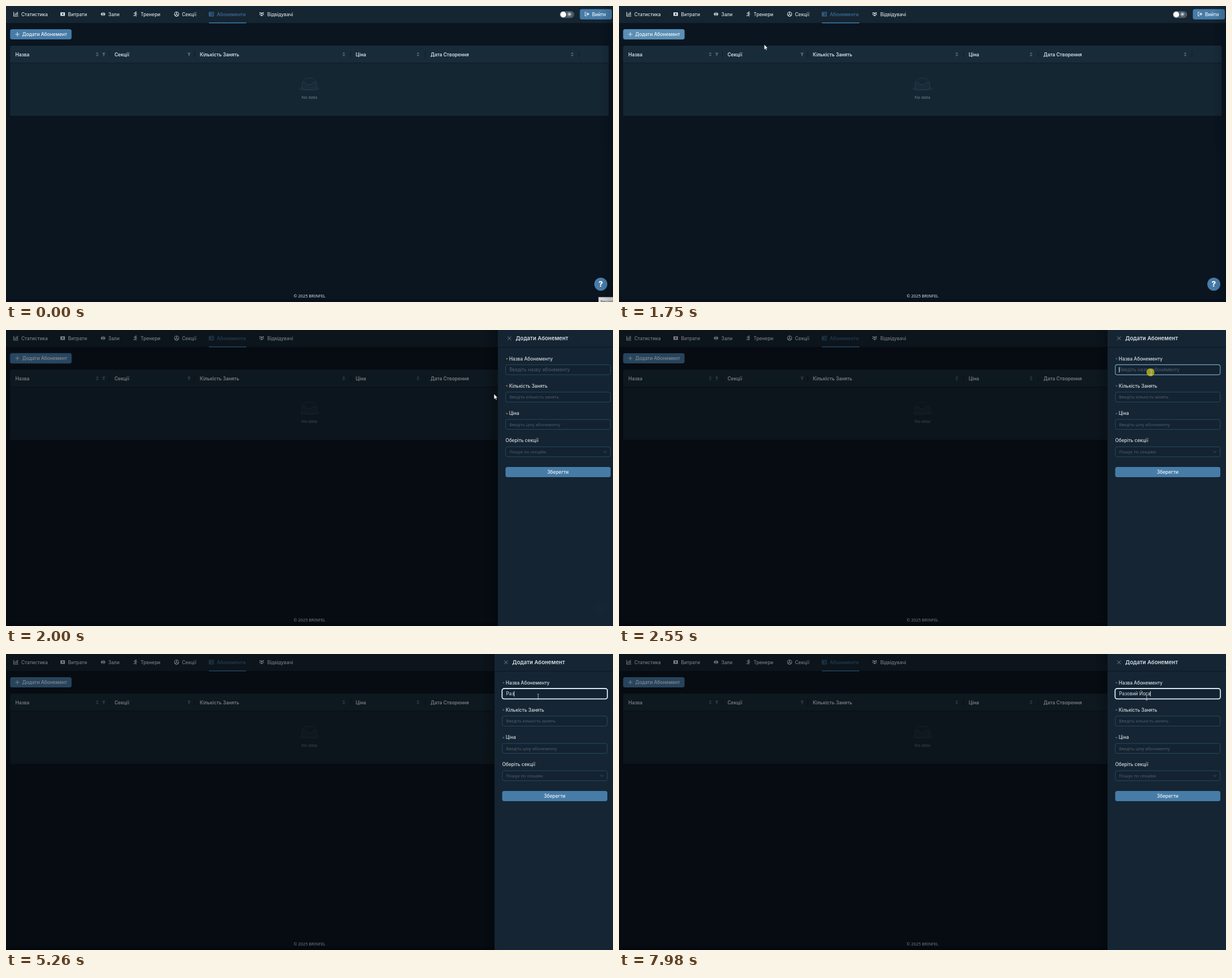
Recreate the animation shown at these times as an HTML page. Size 1071x523 px, loop 8000 ms.

```html
<!DOCTYPE html>
<html lang="uk">
<head>
<meta charset="utf-8">
<title>Абонементи</title>
<style>
html, body { margin: 0; width: 100%; height: 100%; overflow: hidden; background: #0a1520; }
svg { display: block; width: 100vw; height: 100vh; }
text { font: 500 8.25px Inter, "Noto Sans", sans-serif; fill: #d9e0e6; white-space: pre; }
.head { font-weight: 600; font-size: 8.3px; }
.title { font-weight: 600; font-size: 9.6px; }
.btn { font-size: 8.3px; fill: #f2f6fa; }
.active { fill: #3e7099; }
.small { font: 400 7.4px "Noto Sans", sans-serif; }
.hint { fill: #4e5f6e; }
.big { font-size: 8.25px; font-weight: 400; }
.mid { text-anchor: middle; }
.ico { fill: none; stroke: #d9e0e6; stroke-width: 1.1; }
.solid { fill: #d9e0e6; stroke: none; }
.blue { stroke: #3e7099; }
.dim { fill: #536574; }
</style>
</head>
<body>
<svg id="stage" viewBox="0 0 1071 523" preserveAspectRatio="none">
  <defs>
    <linearGradient id="shade">
      <stop offset="0" stop-color="#000" stop-opacity="0"/>
      <stop offset="1" stop-color="#000" stop-opacity=".22"/>
    </linearGradient>
  </defs>
  <g id="page">
    <rect width="1071" height="523" fill="#0a1520"/>
    <rect y="518" width="1071" height="5" fill="#07101b"/>
    <rect width="1071" height="30" fill="#152532"/>
    <rect x="358" y="29" width="66" height="1.5" fill="#3f7dac"/>
    <g id="icons">
      <path class="ico" d="M13.6 10.5v7.5h8M16 16.5v-3M18.2 16.5v-5M20.4 16.5v-6"/>
      <path class="ico solid" d="M96 11.2h8v6.2h-8zM98.7 14.3a1.4 1.4 0 0 0 2.8 0 1.4 1.4 0 0 0-2.8 0z" fill-rule="evenodd"/>
      <path class="ico" d="M167 14.3h8.4M168.5 12.4v4M170 11v6.6M172.6 11v6.6M174.1 12.4v4"/>
      <circle class="ico solid" cx="229.3" cy="10.9" r="1.1"/>
      <path class="ico" d="M225.3 13.4l1.8-1.2 2 .8-1.2 2.5 1.8 1.2-.5 2M227.6 15.5l-1 1.8h-2M229 13l1 1.2h1.6"/>
      <circle class="ico" cx="301" cy="14.3" r="3.8" stroke-width=".8"/>
      <path class="ico" stroke-width=".8" d="M301 10.5v3.4l-2.6 3M301 13.9l2.6 3"/>
      <path class="ico blue" stroke-width=".9" d="M358.5 11h7.6v6.6h-7.6zM360 13h2v1.6h-2zM363.3 13h1.6M363.3 15h1.6M360 16h2"/>
      <path class="ico solid" d="M449 17.6c0-3.3 4.2-3.3 4.2 0zM447 15.8c0-2 1.8-2.3 2.3-1.3l-.8 1.3zM455.2 15.8c0-2-1.8-2.3-2.3-1.3l.8 1.3z"/>
      <circle class="ico solid" cx="451.1" cy="13" r="1.5"/>
      <circle class="ico solid" cx="448.4" cy="12.2" r="1.1"/>
      <circle class="ico solid" cx="453.8" cy="12.2" r="1.1"/>
    </g>
    <rect x="977" y="9" width="25.5" height="12.2" rx="6.1" fill="#4b5a67"/>
    <circle cx="983.2" cy="15.1" r="5.1" fill="#fff"/>
    <circle cx="994" cy="14.6" r="1.5" fill="#f2f6fa"/>
    <circle cx="994" cy="14.6" r="2.8" fill="none" stroke="#f2f6fa" stroke-width="1.1" stroke-dasharray="1.2 1"/>
    <rect x="1012.5" y="5.5" width="56.5" height="18.2" rx="3.5" fill="#477ca8"/>
    <path class="ico" d="M1024.6 11h-2.8v6.4h2.8"/>
    <path class="ico solid" d="M1024 13.2h2v-2l3.3 3-3.3 3v-2h-2z"/>
    <rect id="wave" x="6.5" y="40.5" width="109.5" height="19" rx="4" fill="none" stroke="#477ca8"/>
    <rect id="add" x="7.3" y="41" width="108.4" height="18" rx="3.5" fill="#477ca8"/>
    <path class="ico" stroke-width=".9" d="M16.3 50h7.4M20 46.3v7.4"/>
    <path d="M7.3 194V74a4 4 0 0 1 4-4h1048a4 4 0 0 1 4 4v120z" fill="#152633"/>
    <path d="M7.3 100.5V74a4 4 0 0 1 4-4h1048a4 4 0 0 1 4 4v26.5z" fill="#182b39"/>
    <path d="M7.3 100.8h1056" stroke="#0d1924"/>
    <g id="marks"></g>
    <g transform="translate(517.3 127.8) scale(.56)" fill="none" stroke="#2c3e4c" stroke-width="1.4">
      <ellipse cx="32" cy="33" rx="32" ry="7" fill="#1c2e3b" stroke="none"/>
      <path fill="#152633" d="M9 13L19.5 1.2Q20.5 0 21.5 0h21q1 0 2 1.2L55 13v19q0 3-3 3H12q-3 0-3-3z"/>
      <path fill="#192b38" d="M9 13h11q2.4 0 2.4 3t2.4 3h14.4q2.4 0 2.4-3t2.4-3h11v19q0 3-3 3H12q-3 0-3-3z"/>
    </g>
    <circle cx="1049.5" cy="491.5" r="11.5" fill="#477ca8"/>
    <text class="mid" x="1049.5" y="496.2" style="font-size:13.5px;font-weight:800;fill:#fff">?</text>
    <g id="tip">
      <rect x="1045.5" y="514.5" width="30" height="12" fill="#d9d9d9" stroke="#8b8f94"/>
      <text class="small" x="1049" y="525" style="fill:#444;font-size:7px">Record</text>
    </g>
  </g>
  <rect id="mask" width="1071" height="523"/>
  <g id="drawer">
    <rect x="840" width="22" height="523" fill="url(#shade)"/>
    <rect x="862" width="215" height="523" fill="#152533"/>
    <path d="M862 30.3h215" stroke="#0c1823"/>
    <path d="M879 11.5l6.4 6.4M885.4 11.5l-6.4 6.4" stroke="#8794a0" stroke-width=".9"/>
    <g id="form"></g>
    <path d="M1048.4 213.6l2.7 3 2.7-3" fill="none" stroke="#45586a" stroke-width=".9"/>
    <rect x="875.5" y="242" width="185.5" height="18" rx="3.5" fill="#477ca8"/>
    <path id="caret" d="M0 65.5v9.5" stroke="#e6edf3" stroke-width=".9"/>
  </g>
  <circle id="press" r="7" fill="#d2cc16" opacity=".72"/>
  <g id="arrow"><path d="M0 0v9.2l2.1-1.9 1.4 3.1 1.5-.7-1.4-3h2.9z" fill="#fff" stroke="#10151b" stroke-width=".5"/></g>
  <g id="hand"><path d="M-.9.5q0-1 .9-1t.9 1v4l3 .7q1.4.4 1.3 1.8l-.6 4.3h-5.4L-3.7 7.6q-.6-1.3.7-1.4l2.1 1.4z" fill="#fff" stroke="#10151b" stroke-width=".7"/></g>
  <g id="beam"><path d="M-1.6-4.5h1.2l.4.4.4-.4h1.2M0-4.1v8.2M-1.6 4.5h1.2l.4-.4.4.4h1.2" fill="none" stroke="#c9d2da" stroke-width=".8"/></g>
</svg>
<script>
const LOOP = 8000, NS = "http://www.w3.org/2000/svg";
const $ = id => document.getElementById(id);

function add(parent, tag, attrs, text) {
  const el = document.createElementNS(NS, tag);
  set(el, attrs);
  if (text) el.textContent = text;
  return parent.appendChild(el);
}
function set(el, attrs) {
  for (const k in attrs) el.setAttribute(k, attrs[k]);
}
const label = (parent, x, y, text, cls = "") => add(parent, "text", { x, y, class: cls }, text);

const page = $("page"), form = $("form"), marks = $("marks"), drawer = $("drawer");

[["Статистика", 27], ["Витрати", 109.5], ["Зали", 180.5], ["Тренери", 237.5], ["Секції", 310.5],
 ["Абонементи", 372, "active"], ["Відвідувачі", 461]].forEach(([s, x, cls]) => label(page, x, 17.5, s, cls));
label(page, 1034, 17.5, "Вийти", "btn");
label(page, 28.5, 53, "Додати Абонемент", "btn");
[["Назва", 16.5], ["Секції", 191.5], ["Кількість Занять", 342], ["Ціна", 617], ["Дата Створення", 749]]
  .forEach(([s, x]) => label(page, x, 88.5, s, "head"));
label(page, 535.3, 164, "No data", "small mid").style.fill = "#76838e";
label(page, 535.5, 514.5, "© 2025 BRINFEL", "small mid");

for (const x of [182.5, 333, 608, 740, 1011])
  add(marks, "path", { d: `M${x} 79.5v12`, stroke: "#0f1d28" });
for (const x of [161, 596, 727, 999])
  add(marks, "path", { class: "dim", d: `M${x - 2.6} 84.6l2.6-3 2.6 3zM${x - 2.6} 86.2l2.6 3 2.6-3z` });
for (const x of [172.5, 323])
  add(marks, "path", { class: "dim", d: `M${x - 3} 82.5h6l-2 3v3h-2v-3z` });

label(form, 893.3, 17.8, "Додати Абонемент", "title");
const stars = [], boxes = [], hints = [];
[["Назва Абонементу", "Введіть назву абонементу", "big"],
 ["Кількість Занять", "Введіть кількість занять", "small"],
 ["Ціна", "Введіть ціну абонементу", "small"],
 ["Оберіть секції", "Пошук по секціям", "small"]].forEach(([name, hint, cls], i) => {
  const y = 48.3 * i;
  if (i < 3) stars.push(label(form, 875.8, 54 + y, "*", "small"));
  label(form, i < 3 ? 881.8 : 875.5, 53.5 + y, name);
  boxes.push(add(form, "rect", { x: 875.7, y: 61.4 + y, width: 185, height: 17.6, rx: 3.2, fill: "#142331", stroke: "#254a64" }));
  hints.push(label(form, 882.3, 73.1 + y, hint, cls + " hint"));
});
const typed = label(form, 882.3, 73.1, "", "big");
label(drawer, 968, 254, "Зберегти", "btn mid");

const word = "Разовий Йога";
// [time, letters shown]
const typing = [[4580, 1], [5190, 2], [5260, 3], [5380, 4], [5450, 5], [5650, 7], [5790, 8],
  [6520, 9], [6720, 10], [6860, 11], [6920, 12]];
// caret switches on, off, on, off...
const blinks = [2490, 3110, 3640, 4170, 4580, 5120, 5190, 6320, 6520, 7460, 7980];
// [time, x, y]
const route = [[70, 1064, 519], [210, 960, 470], [400, 560, 330], [610, 131, 170], [820, 166, 106],
  [960, 120, 74], [1110, 72, 51], [1180, 70, 49.5], [1710, 70, 49.5], [1870, 796.5, 121.5],
  [2080, 900, 108], [2410, 939, 75.5], [7979, 939, 75.5], [7980, 931, 77]];

const clamp = v => Math.max(0, Math.min(1, v));
const ramp = (t, start, len) => clamp((t - start) / len);
const mix = (a, b, p) => a + (b - a) * p;
const blend = (a, b, p) => `rgb(${a.map((v, i) => Math.round(mix(v, b[i], p)))})`;
const last = (table, t) => table.filter(r => r[0] <= t).pop();
const show = (el, on) => el.setAttribute("visibility", on ? "visible" : "hidden");

// CSS "ease"
function ease(x) {
  let lo = 0, hi = 1, u = x;
  for (let i = 0; i < 20; i++) {
    u = (lo + hi) / 2;
    const bx = .75 * u * (1 - u) + u * u * u;
    if (bx < x) lo = u; else hi = u;
  }
  return .3 * u * (1 - u) * (1 - u) + 3 * u * u * (1 - u) + u * u * u;
}

function pointer(t) {
  const i = route.findIndex(r => r[0] > t);
  if (i < 0) return route[route.length - 1].slice(1);
  if (i === 0) return route[0].slice(1);
  const [t0, x0, y0] = route[i - 1], [t1, x1, y1] = route[i];
  const p = (t - t0) / (t1 - t0);
  return [mix(x0, x1, p), mix(y0, y1, p)];
}

function draw(t) {
  const [x, y] = pointer(t);
  const onButton = t < 1800 && x < 116 && y < 59;
  const onInput = t > 2300;
  show($("arrow"), t >= 70 && !onButton && !onInput);
  show($("hand"), onButton);
  show($("beam"), onInput);
  for (const id of ["arrow", "hand", "beam"]) $(id).setAttribute("transform", `translate(${x} ${y})`);
  show($("tip"), t < 70);

  const hover = ramp(t, 1040, 130) * (1 - ramp(t, 1720, 150));
  $("add").setAttribute("fill", blend([71, 124, 168], [96, 148, 184], hover));
  const wave = ramp(t, 1710, 400);
  set($("wave"), { "stroke-width": 3.5 * ease(wave), opacity: wave > 0 ? .4 * (1 - wave) : 0 });

  const slide = ease(ramp(t, 1765, 300));
  show(drawer, slide > 0);
  set(drawer, { transform: `translate(${209 * (1 - slide)} 0)`, opacity: .7 + .3 * slide });
  $("mask").setAttribute("opacity", .45 * slide);
  stars.forEach(s => s.style.fill = t < 2080 ? "#b98a5c" : "#4b7ca0");

  // the focus ring grows outwards from the border
  const over = ramp(t, 2350, 60), focus = ramp(t, 2520, 180), grow = .4 * focus;
  set(boxes[0], {
    x: 875.7 - grow, y: 61.4 - grow, width: 185 + 2 * grow, height: 17.6 + 2 * grow, rx: 3.2 + grow,
    "stroke-width": 1 + 2 * grow,
    stroke: focus > 0
      ? blend([90, 150, 192], [215, 232, 245], focus)
      : blend([37, 74, 100], [80, 138, 180], over)
  });

  const count = (last(typing, t) || [0, 0])[1];
  const text = word.slice(0, count);
  if (typed.textContent !== text) typed.textContent = text;
  show(hints[0], slide > 0 && !count);
  show($("caret"), blinks.filter(b => b <= t).length % 2);
  $("caret").setAttribute("transform", `translate(${882.6 + (count ? typed.getComputedTextLength() : 0)} 0)`);

  const first = t >= 1640 && t < 1730, second = t >= 2490 && t < 2630;
  show($("press"), first || second);
  set($("press"), first ? { cx: 70, cy: 49.5 } : { cx: 937.7, cy: 74.7 });
}

const start = performance.now();
function tick() {
  draw((performance.now() - start) % LOOP);
  requestAnimationFrame(tick);
}
tick();
</script>
</body>
</html>
```
